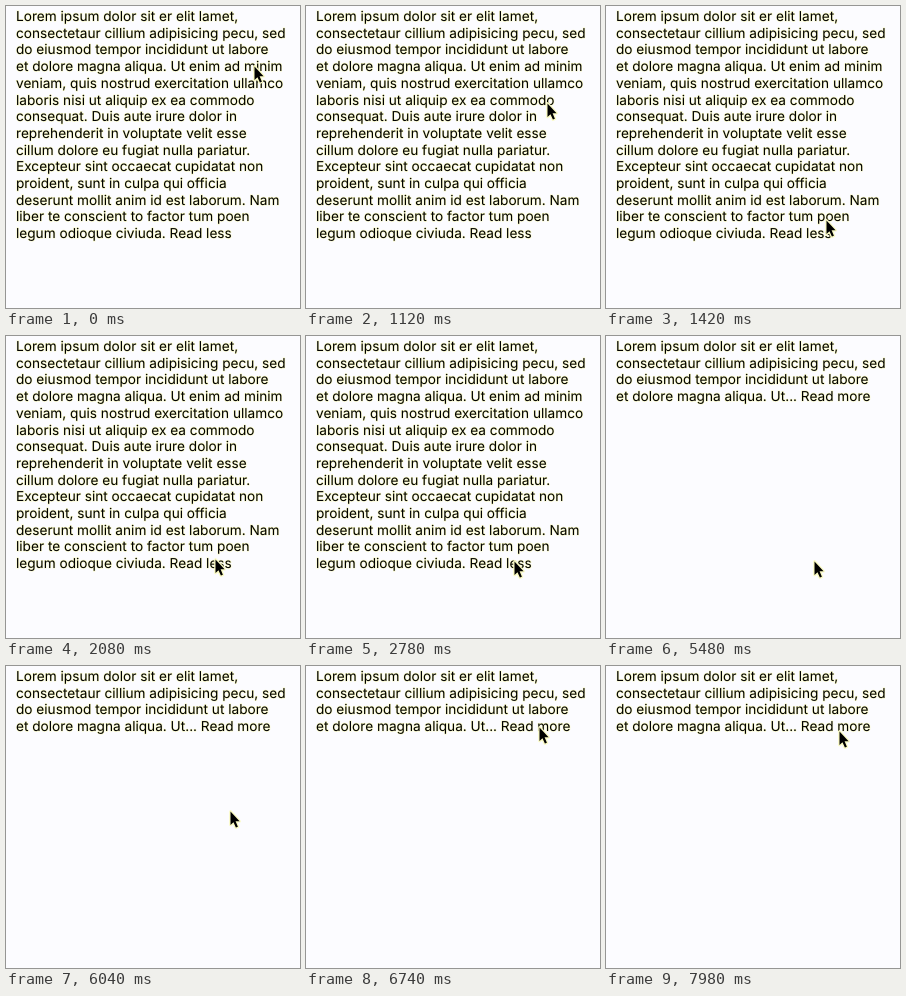
An HTML page for the animation above (8000 ms loop, 294 by 302 pixels).

```html
<!DOCTYPE html>
<html lang="en">
<head>
<meta charset="utf-8">
<title>Read more, read less</title>
<style>
  html, body { margin: 0; width: 100%; height: 100%; overflow: hidden; background: #fcfcff; }
  svg { display: block; width: 294px; height: 302px; }
  text {
    font: 13.65px Inter, "Open Sans", sans-serif;
    text-rendering: geometricPrecision;
    stroke: #fafac4; stroke-width: 1.2; paint-order: stroke;
  }
  #cursor { stroke: #fafac4; stroke-width: 2.6; stroke-linejoin: round; paint-order: stroke; }
</style>
</head>
<body>
<svg viewBox="0 0 294 302">
  <g id="lines"></g>
  <path id="cursor" d="M.5 .5V14L3.5 11.2L5.9 16.6L7.9 15.7L5.6 10.3H9.6Z"/>
</svg>
<script>
const DURATION = 8000, COLLAPSE_AT = 3900;
const LEFT = 10, FIRST_BASELINE = 15, LINE_HEIGHT = 16.7;

const full = `Lorem ipsum dolor sit er elit lamet,
consectetaur cillium adipisicing pecu, sed
do eiusmod tempor incididunt ut labore
et dolore magna aliqua. Ut enim ad minim
veniam, quis nostrud exercitation ullamco
laboris nisi ut aliquip ex ea commodo
consequat. Duis aute irure dolor in
reprehenderit in voluptate velit esse
cillum dolore eu fugiat nulla pariatur.
Excepteur sint occaecat cupidatat non
proident, sunt in culpa qui officia
deserunt mollit anim id est laborum. Nam
liber te conscient to factor tum poen
legum odioque civiuda. Read less`.split("\n");
const short = [...full.slice(0, 3), "et dolore magna aliqua. Ut... Read more"];

const home = { x: 248, y: 60 };
const glides = [
  { from: 980, to: 1420, x: 220, y: 214 },
  { from: 1520, to: 1700, x: 210, y: 219 },
  { from: 1830, to: 2240, x: 208, y: 225 },
  { from: 5880, to: 6040, x: 224, y: 145 },
  { from: 6130, to: 6320, x: 233, y: 61 },
  { from: 7960, to: 7980, x: 233, y: 65 }
];

const linesGroup = document.getElementById("lines");
const cursor = document.getElementById("cursor");
let shown;

function showText(lines) {
  if (shown === lines) return;
  shown = lines;
  linesGroup.innerHTML = lines.map((line, i) =>
    `<text x="${LEFT}" y="${FIRST_BASELINE + i * LINE_HEIGHT}">${line}</text>`).join("");
}

function ease(t, from, to) {
  const k = Math.min(1, Math.max(0, (t - from) / (to - from)));
  return k * k * (3 - 2 * k);
}

function cursorAt(t) {
  return glides.reduce((pos, glide) => {
    const k = ease(t, glide.from, glide.to);
    return { x: pos.x + (glide.x - pos.x) * k, y: pos.y + (glide.y - pos.y) * k };
  }, home);
}

function draw() {
  const t = performance.now() % DURATION;
  const { x, y } = cursorAt(t);
  showText(t < COLLAPSE_AT ? full : short);
  cursor.setAttribute("transform", `translate(${Math.round(x)} ${Math.round(y)})`);
  requestAnimationFrame(draw);
}

draw();
</script>
</body>
</html>
```
